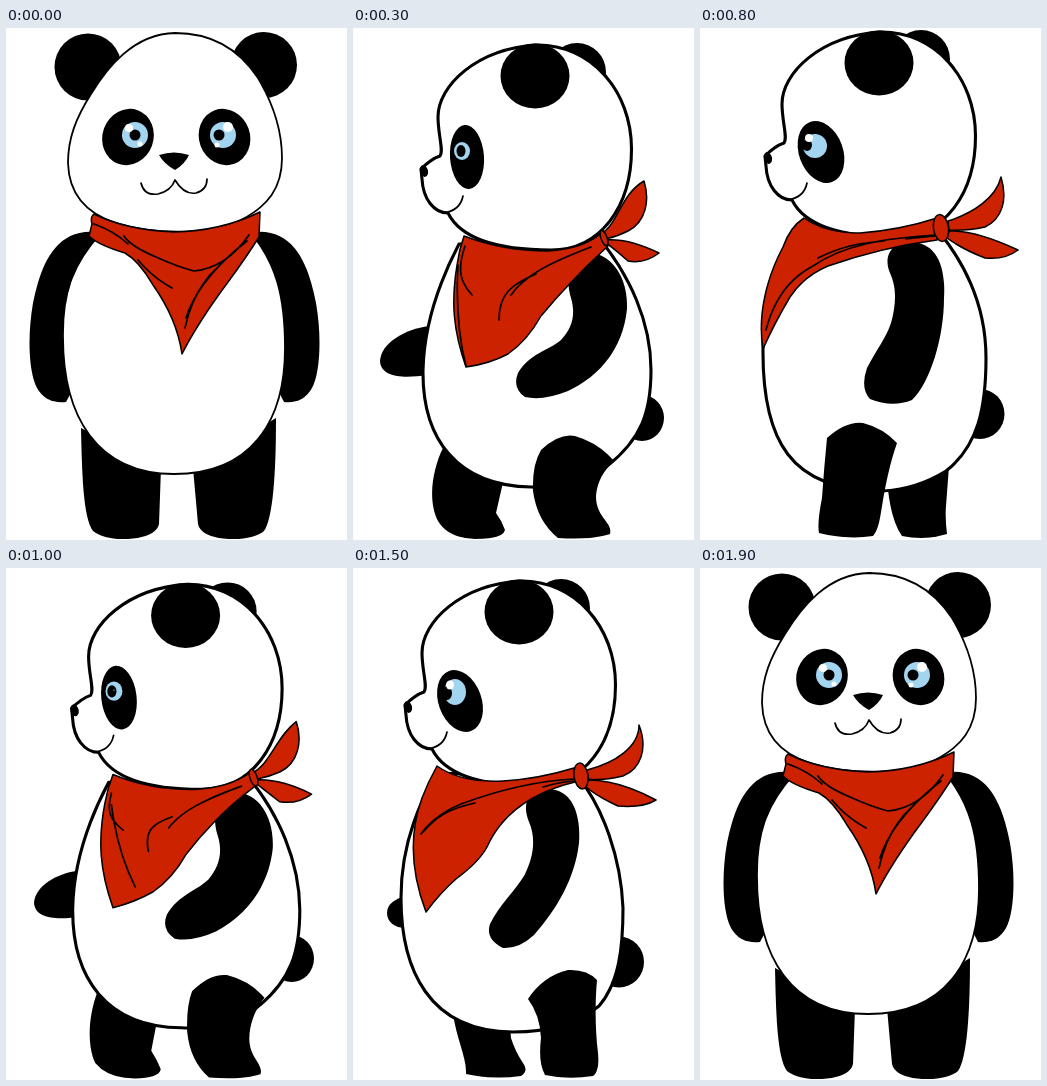
An HTML page for the animation above (2000 ms loop, 341x512 px).

```html
<!DOCTYPE html>
<html lang="en">
<head>
<meta charset="utf-8">
<title>Walking panda</title>
<style>
  html, body { margin: 0; width: 100%; height: 100%; overflow: hidden; background: #fff; }
  svg { display: block; width: 100%; height: 100%; }
  .skin { fill: #fff; stroke: #000; stroke-width: 3.1; stroke-linejoin: round; }
  .thin { stroke-width: 1.8; }
  .cloth { fill: #cc2200; stroke: #000; stroke-width: 1.5; stroke-linejoin: round; }
  .line { fill: none; stroke: #000; stroke-width: 1.7; stroke-linecap: round; stroke-linejoin: round; }
  .iris { fill: #a3d5f0; }
  .shine { fill: #fff; }
</style>
</head>
<body>
<svg viewBox="0 0 341 512">
  <g id="front">
    <circle cx="82" cy="39" r="33.5"/>
    <circle cx="258" cy="37" r="33"/>
    <path d="M90 204C48 200 34 240 27 275C21 310 23 345 31 360Q40 376 60 374L100 300Z"/>
    <path d="M248 204C290 200 303 240 310 275C316 310 314 345 306 360Q297 376 278 374L240 300Z"/>
    <path d="M75 400C76 445 77 490 87 503Q98 512 122 511Q150 509 153 496L155 440Z"/>
    <path d="M270 390C270 445 267 490 258 503Q247 512 222 511Q195 509 192 496L187 440Z"/>
    <path class="skin thin" d="M95 205C68 235 57 262 57 305C56 390 92 446 168 446C244 446 279 395 279 320C279 268 270 235 245 205Z"/>
    <path class="skin thin" d="M169 5C127 6 101 40 85 66C70 90 62 110 62 135C63 170 85 187 110 195C150 207 205 207 235 192C262 178 276 160 276 130C276 100 265 72 252 50C235 24 210 5 169 5Z"/>
    <ellipse cx="122" cy="109" rx="25.5" ry="28.5" transform="rotate(20 122 109)"/>
    <ellipse cx="218.5" cy="109" rx="25.5" ry="28.5" transform="rotate(-20 218.5 109)"/>
    <circle class="iris" cx="129" cy="107" r="13"/>
    <circle class="iris" cx="217" cy="107" r="13"/>
    <circle cx="129" cy="107" r="5.5"/>
    <circle cx="213" cy="107" r="5.5"/>
    <g class="shine">
      <circle cx="123" cy="100" r="4"/><circle cx="134" cy="116" r="2.5"/>
      <circle cx="222" cy="99" r="5"/><circle cx="211" cy="117" r="2.5"/>
    </g>
    <path d="M153 127Q168 122 183 127Q179 136 169 142Q158 136 153 127Z"/>
    <path class="line" d="M135 155Q138 168 152 166Q165 163 169 152Q178 167 190 165Q201 162 201 151"/>
    <path class="cloth" d="M88 186Q84 189 86 196L83 208Q92 217 119 225Q133 233 147 257Q171 291 176 326Q189 300 214 265Q240 230 253 209L254 184Q215 203 168 204Q120 202 88 186Z"/>
    <path class="line" d="M88 196Q108 203 122 216M118 208Q124 218 150 229Q172 239 188 243Q220 240 243 207M132 232Q146 249 166 260M241 213Q193 250 180 290M211 240Q187 262 179 300"/>
  </g>

  <g id="side">
    <path data-part="farHand"/>
    <path data-part="farLeg"/>
    <ellipse data-part="tail"/>
    <path data-part="body" class="skin"/>
    <path data-part="nearLeg"/>
    <path data-part="arm"/>
    <g id="head">
      <circle cx="221" cy="31" r="29"/>
      <path class="skin" d="M180 4C235 3 275.500 50 275.500 108C275.500 165 245 209 195 209C140 209 105 198 92 172C78 172 67 158 66 138L65 128Q75 118 84 115C88 110 82 94 82 76C82 45 120 8 180 4Z"/>
      <ellipse cx="179" cy="35" rx="34.5" ry="32.5"/>
      <ellipse cx="68" cy="130" rx="4" ry="6" transform="rotate(-15 68 130)"/>
      <path class="line" d="M87 172Q104 170 107 155"/>
      <ellipse data-part="patch"/>
      <ellipse data-part="iris" class="iris"/>
      <ellipse data-part="pupil"/>
      <ellipse data-part="shine" class="shine"/>
    </g>
    <path data-part="scarf" class="cloth"/>
    <path data-part="folds" class="line"/>
    <path data-part="ribbons" class="cloth"/>
    <ellipse data-part="knot" class="cloth"/>
  </g>
</svg>
<script>
const FRAME = 100, LOOP = 2000;

// Paths keep one command structure across poses; ellipses are "cx cy rx ry angle".
const pass = {
  head: "0 0",
  farHand: "M76 286C52 289 28 303 27 321C28 339 54 338 74 335Z",
  farLeg: "M128 425C133 455 136 490 130 507Q152 513 172 509Q187 500 190 482L195 440Z",
  tail: "289 378 22 23 0",
  body: "M106 204C82 250 71 290 70 330C69 400 105 446 178 447C205 449 228 442 249 430C290 400 298 370 298 330C298 280 275 235 250 203Z",
  nearLeg: "M177 419Q193 404 215 405Q237 410 250 420C247 438 245 457 245 466C245 490 253 500 252 507Q232 512 205 509Q188 498 182 470Q176 447 177 419Z",
  arm: "M218 258C210 232 222 215 239 213C260 216 275 238 274 269C270 310 245 337 215 351Q190 361 172 357Q159 348 165 333C177 313 195 311 208 300C219 288 223 275 218 258Z",
  scarf: "M111 196Q106 210 104 225C98 262 100 290 113 327Q136 324 155 314Q174 301 188 276Q218 240 255 206L247 194Q230 209 195 211Q150 211 111 196Z",
  folds: "M112 206C104 230 107 242 119 255M105 225C103 262 105 295 113 326M183 234C157 245 146 255 146 280M238 207C196 223 171 236 158 255",
  ribbons: "M248 194C265 184 268 154 291 141C297 160 293 182 275 191Q263 197 252 199ZM252 200Q275 198 306 213Q292 224 275 221Q264 211 252 202Z",
  knot: "251 198 3 8 -20",
  patch: "120 122 22 33 -20",
  iris: "118 121 7 1.2 0",
  pupil: "118 121 0 0 0",
  shine: "118 121 0 0 0"
};

const reach = {
  ...shifted(pass, 0, 12),
  head: "3 13",
  farLeg: "M90 420C80 440 74 472 85 493Q95 510 122 511Q150 511 152 502Q149 493 143 485L151 450Z",
  nearLeg: "M188 422Q206 405 222 408Q246 415 261 433C250 443 244 455 243 468C243 490 260 494 257 506Q240 512 205 510Q184 493 180 463Q179 437 188 422Z",
  patch: "111 116 17 32 -4",
  iris: "106 110 8 9 0",
  pupil: "105 110 4.5 6 0",
  shine: "107 110 0 0 0"
};

const rise = {
  head: "0 0",
  farHand: "M70 290C64 295 62 300 61 306C61 312 63 320 70 325Z",
  farLeg: "M186 440C188 468 191 492 202 508Q225 513 247 506Q245 490 246 478L249 438Z",
  tail: "280 386 24.5 25 0",
  body: "M104 195C75 230 62 280 63 320C62 412 90 463 182 463C205 462 225 456 246 443C278 418 286 380 286 330C286 280 268 240 240 205Z",
  nearLeg: "M127 410Q146 393 163 395Q183 400 197 415C190 435 186 455 183 472C180 490 179 501 173 508Q147 512 119 505Q117 495 122 470Q124 440 127 410Z",
  arm: "M190 245C183 229 191 214 210 214C236 214 246 237 244 270C244 310 230 355 212 372Q192 380 170 371Q160 360 167 340C177 321 186 310 191 295C196 277 197 260 190 245Z",
  scarf: "M104 190Q90 199 83 219C68 247 57 285 63 321Q74 296 90 269Q104 248 128 238Q183 219 237 212L237 190Q200 202 160 205Q125 205 104 190Z",
  folds: "M66 302C73 275 88 251 113 238M113 238C143 217 185 210 236 207M118 230C142 218 160 215 184 213M236 208C224 209 215 210 206 211",
  ribbons: "M248 193C273 185 296 170 301 149C308 172 302 191 285 199Q266 203 249 202ZM249 203Q275 202 318 222Q305 232 285 230Q262 221 247 210Z",
  knot: "241 200 7.5 13.5 -8",
  patch: "121 124 22 32 -20",
  iris: "115 118 12 12 0",
  pupil: "107 117 5 6 0",
  shine: "109 110 4 4 0"
};

const step = {
  head: "-13 9",
  farHand: "M55 328C42 330 34 336 34 345C34 354 42 361 56 360Z",
  farLeg: "M100 445C103 470 114 490 113 506Q140 512 168 508Q176 503 170 495Q162 483 158 470L156 445Z",
  tail: "266 394 25 25.5 0",
  body: "M84 205C60 245 48 285 48 330C48 400 75 464 160 464C195 464 225 455 246 438C266 415 270 380 270 340C268 290 250 240 226 210Z",
  nearLeg: "M175 431Q190 408 215 402Q234 401 244 412C242 435 242 460 245 485C246 495 245 505 240 508Q215 512 192 507Q185 495 188 470Q187 447 175 431Z",
  arm: "M176 254C168 234 176 221 196 221C219 222 228 245 226 275C222 310 204 341 181 367Q166 381 150 380Q132 371 137 356C147 336 161 324 171 308C181 289 183 270 176 254Z",
  scarf: "M84 198Q75 214 69 230C57 263 57 302 73 344Q88 324 103 311Q126 294 134 279Q156 230 222 214L221 200Q185 211 150 213Q108 215 84 198Z",
  folds: "M68 266C78 252 91 243 108 236M108 236C143 223 180 213 221 211M70 264C83 249 95 241 122 235M221 213C208 214 200 216 190 219",
  ribbons: "M234 202C262 195 286 179 286 157C295 180 288 201 270 208Q251 213 235 211ZM235 212Q265 212 303 232Q290 240 265 238Q245 229 233 219Z",
  knot: "228 208 7 13 -8",
  patch: "120 124 21.5 32 -20",
  iris: "115 115 11 13 0",
  pupil: "107 116 5 7 0",
  shine: "110 108 4 4.5 0"
};

// Each entry is [from, to, blend]; null is the front view.
const walk = [[pass, rise, 0.5], [rise], [step], [step, reach, 0.85], [reach, pass, 0.5], [pass]];
const timeline = [
  null, [pass], [pass, reach, 0.5], [reach],
  [reach, pass, 0.33], [reach, pass, 0.67], [pass],
  ...walk, ...walk.slice(0, 5), null, null
];

const front = document.getElementById("front");
const side = document.getElementById("side");
const head = document.getElementById("head");
const parts = [...side.querySelectorAll("[data-part]")];
let shown = -1;

function shifted(pose, dx, dy) {
  const move = text => {
    let i = 0;
    const isPath = text[0] === "M";
    return text.replace(/-?[\d.]+/g, n => {
      const k = i++;
      return isPath || k < 2 ? +n + (k % 2 ? dy : dx) : n;
    });
  };
  return Object.fromEntries(Object.entries(pose).map(([name, text]) => [name, move(text)]));
}

function blend(a, b, k) {
  const goal = b.match(/-?[\d.]+/g);
  let i = 0;
  return a.replace(/-?[\d.]+/g, n => +n + (goal[i++] - n) * k);
}

function drawSide([from, to = from, k = 0]) {
  const value = name => blend(from[name], to[name], k);
  head.setAttribute("transform", `translate(${value("head")})`);
  for (const el of parts) {
    const text = value(el.dataset.part);
    if (el.tagName === "path") {
      el.setAttribute("d", text);
      continue;
    }
    const [cx, cy, rx, ry, angle] = text.split(" ");
    Object.entries({ cx, cy, rx, ry }).forEach(([key, v]) => el.setAttribute(key, v));
    el.setAttribute("transform", `rotate(${angle} ${cx} ${cy})`);
  }
}

function draw() {
  const index = Math.floor((performance.now() % LOOP) / FRAME);
  if (index !== shown) {
    shown = index;
    const pose = timeline[index];
    front.style.display = pose ? "none" : "";
    side.style.display = pose ? "" : "none";
    if (pose) drawSide(pose);
  }
  requestAnimationFrame(draw);
}
draw();
</script>
</body>
</html>
```
